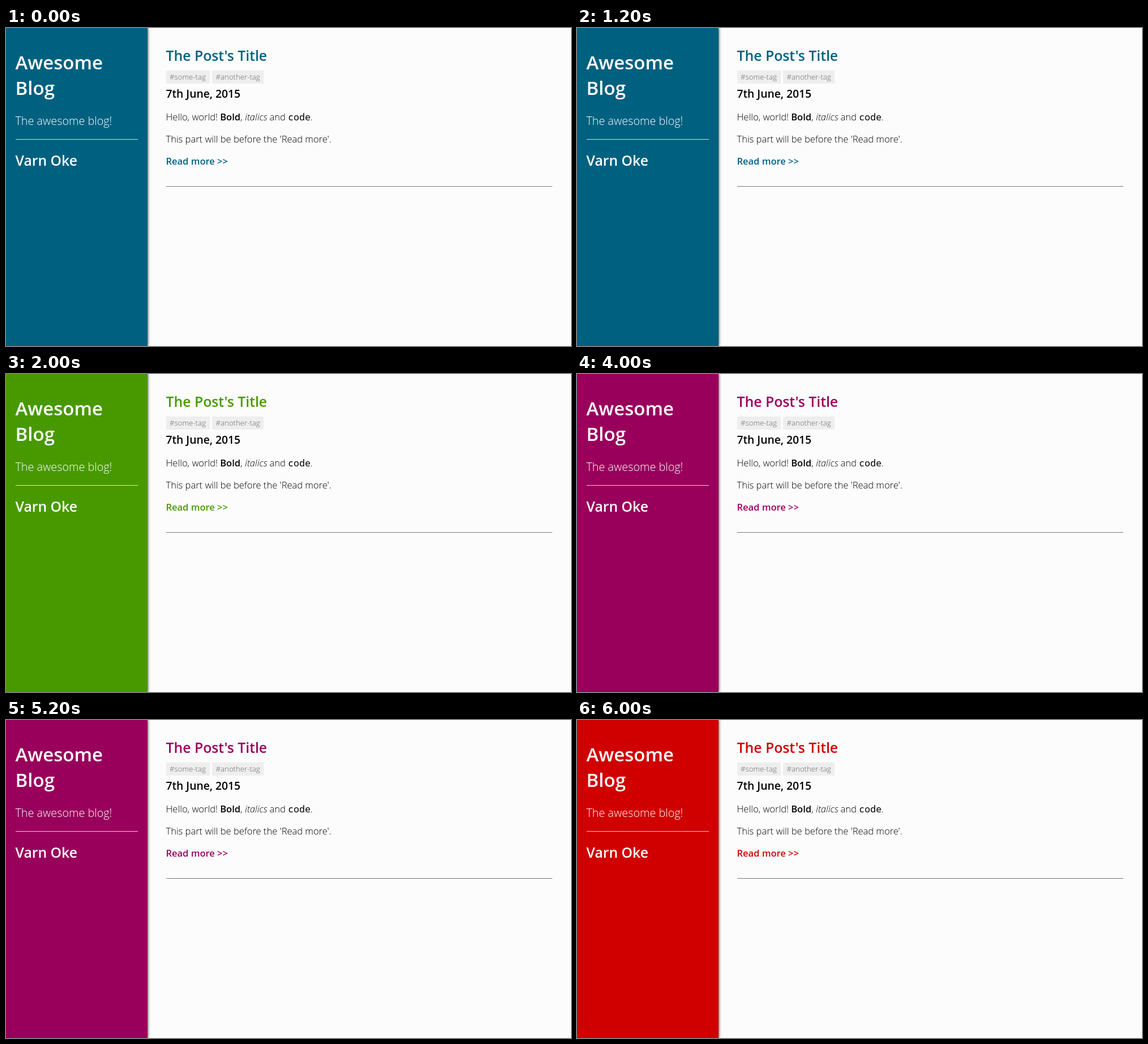
Recreate the animation shown at these times as an HTML page. Size 998 px wide and 561 px high, loop 8 s.

```html
<!DOCTYPE html>
<html lang="en">
<head>
<meta charset="utf-8">
<title>Awesome Blog</title>
<style>
html, body { margin: 0; width: 100%; height: 100%; overflow: hidden; }
body {
  position: relative;
  background: #fcfcfc;
  font: 300 16.5px "Open Sans", sans-serif;
  animation: theme 8s step-end infinite;
}
@keyframes theme {
  0% { color: #006080; }
  25% { color: #489900; }
  50% { color: #99005c; }
  75% { color: #d00000; }
}
aside {
  position: absolute;
  left: 0; top: 0; bottom: 0;
  width: 250px;
  background: currentColor;
  box-shadow: 1px 0 4px #555;
}
h1, h2, h3, p, hr, .tag { position: absolute; margin: 0; white-space: nowrap; }
h1, h2, h3, b { font-weight: 600; }
aside > * { left: 16.5px; color: #fff; }
main > * { left: 282.5px; }
h1 { top: 38px; font-size: 2em; line-height: 45px; }
h2 { font-size: 1.5em; }
h3 { top: 102px; font-size: 1.17em; }
h3, main p { color: #000; }
.about { top: 150px; font-size: 1.2em; }
.name { top: 217px; }
.title { top: 32px; }
.tag {
  top: 75px;
  padding: 2px 6.6px;
  height: 18.5px;
  background: #eee;
  color: #666;
  font-size: .8em;
}
.tag + .tag { left: 364px; }
code { font: 500 1em "Noto Sans Mono", monospace; }
main .more { top: 223px; color: inherit; font-weight: 600; }
hr { border: 0; height: 1px; }
aside hr { top: 196px; width: 216.5px; background: #fffc; }
main hr { top: 279px; width: 682.5px; background: #777; }
</style>
</head>
<body>
<aside>
  <h1>Awesome<br>Blog</h1>
  <p class="about">The awesome blog!</p>
  <hr>
  <h2 class="name">Varn Oke</h2>
</aside>
<main>
  <h2 class="title">The Post's Title</h2>
  <span class="tag">#some-tag</span>
  <span class="tag">#another-tag</span>
  <h3>7th June, 2015</h3>
  <p style="top:145px">Hello, world! <b>Bold</b>, <i>italics</i> and <code>code</code>.</p>
  <p style="top:184px">This part will be before the 'Read more'.</p>
  <p class="more">Read more &gt;&gt;</p>
  <hr>
</main>
</body>
</html>
```
